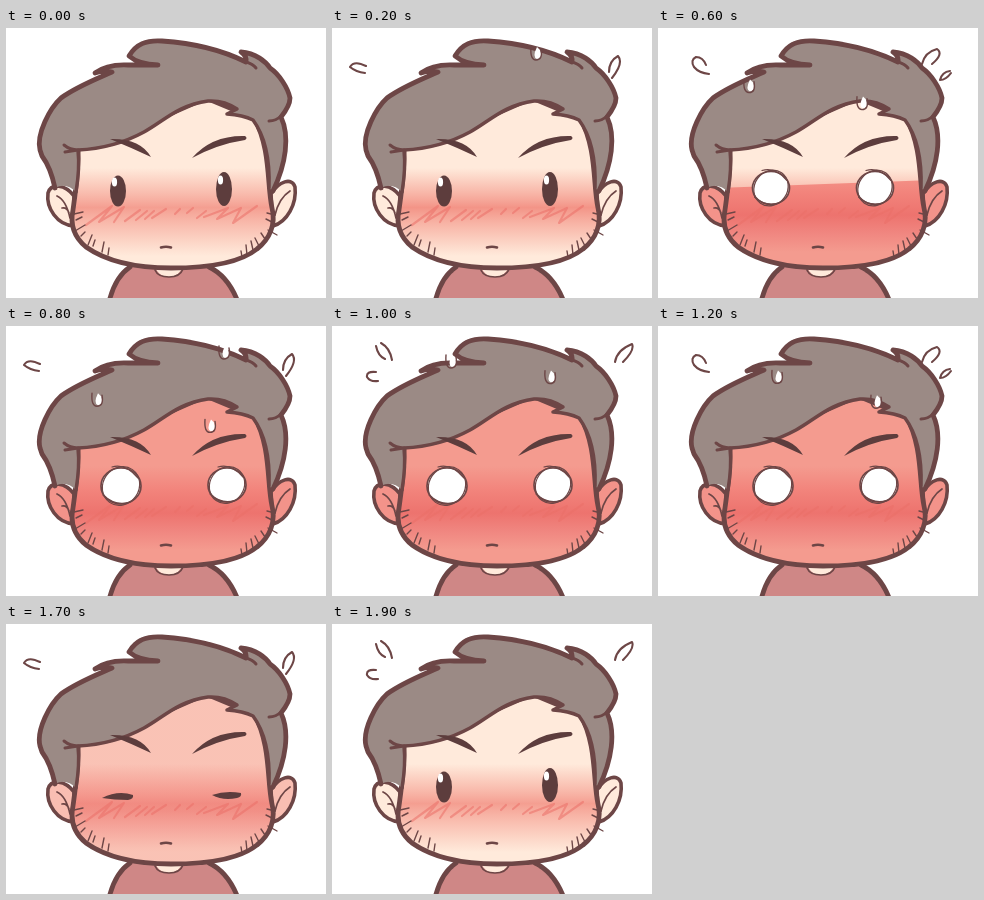
Recreate the animation shown at these times as an HTML page. Size 320 by 270 pixels, loop 2000 ms.

```html
<!DOCTYPE html>
<html lang="en">
<head>
<meta charset="utf-8">
<title>Blushing face</title>
<style>
html, body { margin: 0; width: 100%; height: 100%; overflow: hidden; background: #fff; }
svg { display: block; width: 320px; height: 270px; }
.line { fill: none; stroke: #6d4646; stroke-linecap: round; stroke-linejoin: round; }
.thick { stroke-width: 4.8; }
.thin { stroke-width: 1.7; }
.dark { fill: #5d3d3d; }
.skin { fill: #ffeadb; }
</style>
</head>
<body>
<svg viewBox="0 0 320 270">
  <defs>
    <path id="face" d="M72 118C73 140 70 160 67 182C64 196 68 209 80 219C100 233 130 240 165 240C205 240 235 234 251 221C264 211 270 196 266 180C261 158 265 120 248 90L200 70L150 92Z"/>
    <path id="ears" d="M68 168C59 156 45 155 42 165C40 180 51 197 68 198ZM265 166C273 153 286 149 289 159C291 176 281 194 267 198Z"/>
    <clipPath id="inFace"><use href="#face"/></clipPath>
    <linearGradient id="blush" gradientUnits="userSpaceOnUse" x1="0" y1="140" x2="0" y2="228">
      <stop stop-color="#f5a193" stop-opacity="0"/>
      <stop offset=".22" stop-color="#f5a193" stop-opacity=".55"/>
      <stop offset=".45" stop-color="#f39487"/>
      <stop offset=".65" stop-color="#f5a193" stop-opacity=".7"/>
      <stop offset="1" stop-color="#f5a193" stop-opacity="0"/>
    </linearGradient>
    <linearGradient id="heat" gradientUnits="userSpaceOnUse" x1="0" y1="140" x2="0" y2="240">
      <stop stop-color="#f49b8f"/>
      <stop offset=".25" stop-color="#f2837b"/>
      <stop offset=".47" stop-color="#ed736e"/>
      <stop offset=".65" stop-color="#f08680"/>
      <stop offset=".84" stop-color="#f49b8f"/>
    </linearGradient>
    <g id="drop">
      <path fill="#fff" d="M0-6Q-5 4 0 6Q6 5 3-3Z"/>
      <path class="line" stroke-width="1.4" d="M-6-6Q-7 7-1 7Q6 7 4-4"/>
    </g>
    <path id="hairEdge" d="M49 160C46 146 42 136 36 128L34 122C30 106 44 80 55 70C70 59 88 52 106 44Q97 42 89 45Q101 36 122 37L152 37Q132 36 123 28C130 16 140 12 156 13C186 15 216 22 240 34Q241 28 235 24C250 25 260 34 264 40C273 46 282 60 284 70C284 77 279 84 275 89C284 108 280 136 267 163"/>
    <path id="fringe" d="M263 160C264 132 259 108 247 92Q237 87 221 86L231 81Q218 72 202 73C172 77 158 93 138 104C116 116 93 121 72 122Q74 140 70 164"/>
  </defs>

  <path fill="#cf8786" d="M102 275Q108 247 126 238H200Q222 246 232 275Z"/>
  <path class="skin" d="M149 238H177Q174 248 163 249Q152 249 149 238Z"/>
  <path class="line thin" d="M149 242Q152 249 163 249Q174 249 177 241"/>
  <path class="line thick" d="M103 274Q109 249 124 239M203 239Q222 248 232 274"/>

  <use href="#ears" class="skin"/>
  <use href="#ears" id="hotEars" fill="#f3938a"/>
  <use href="#ears" class="line" stroke-width="3.6"/>
  <path class="line thin" d="M51 168Q60 172 64 190M56 180Q61 179 63 185M284 163Q273 170 269 187"/>

  <use href="#face" class="skin"/>
  <g clip-path="url(#inFace)">
    <rect id="glow" x="60" y="140" width="215" height="90" fill="url(#blush)"/>
    <path id="flush" fill="url(#heat)"/>
    <path id="scribble" fill="none" stroke="#ec7068" stroke-width="2.2" stroke-linecap="round" stroke-linejoin="round"
      d="M80 197L106 178L93 194L118 179L108 194M119 193L134 182M130 192L141 183M139 191L148 183M146 190L160 181M169 186L174 181M181 185L187 180M191 190L200 183M198 189L222 180L211 191L235 180L227 195L251 178"/>
  </g>
  <use href="#face" class="line thick"/>

  <path fill="#9b8a85" d="M49 160C46 146 42 136 36 128L34 122C30 106 44 80 55 70C70 59 88 52 106 44Q97 42 89 45Q101 36 122 37L152 37Q132 36 123 28C130 16 140 12 156 13C186 15 216 22 240 34Q241 28 235 24C250 25 260 34 264 40C273 46 282 60 284 70C284 77 279 84 275 89C284 108 280 136 267 163L263 160C264 132 259 108 247 92Q237 87 221 86L231 81Q218 72 202 73C172 77 158 93 138 104C116 116 93 121 72 122Q74 140 70 164Q60 154 49 160Z"/>
  <use href="#hairEdge" class="line thick"/>
  <use href="#fringe" class="line" stroke-width="3.5"/>
  <path class="line" stroke-width="3" d="M58 117Q64 122 72 122M59 124L72 122M275 88Q270 93 263 93M240 34Q247 36 250 40"/>
  <path class="line" stroke-width="1.4" d="M68 186L77 184M70 192L76 189M69 203L79 197M75 208L79 204M82 217L86 207M87 218L89 212M96 224L98 214M102 227L103 220M269 187L261 185M266 194L260 191M271 207L262 202M259 211L255 205M254 220L249 210M247 222L245 213M241 227L240 217M236 229L235 223"/>
  <path class="dark" d="M104 111Q134 110 145 129Q126 120 104 111ZM186 130Q206 107 239 108Q242 110 239 112Q212 116 186 130Z"/>
  <path class="line" stroke-width="2.6" d="M155 219.5Q160 218 165 219.5"/>

  <g id="open">
    <g class="dark"><ellipse cx="112" cy="163" rx="8" ry="15.5"/><ellipse cx="218" cy="161" rx="8" ry="17"/></g>
    <g fill="#fff"><ellipse cx="108.5" cy="154" rx="2.6" ry="4.5"/><ellipse cx="214.5" cy="152" rx="2.6" ry="4.5"/></g>
  </g>
  <path id="shut" class="dark" d="M96 174Q112 166 127 171Q128 175 122 176Q108 176 96 174ZM206 171Q220 166 235 169Q236 173 231 174Q217 177 206 171Z"/>
  <g id="blank"></g>
  <g id="drops"></g>
  <path id="flicks" class="line" stroke-width="2.1"/>
</svg>
<script>
const $ = id => document.getElementById(id);
const show = (id, on) => $(id).setAttribute('visibility', on ? 'visible' : 'hidden');

const flicks = [
  'M48 37Q45 29 38 29Q32 32 36 39Q41 45 51 46M264 36Q267 24 279 21Q286 26 274 36M292 43Q284 44 282 52Q288 52 293 45',
  'M44 20Q46 30 53 33M49 17Q58 22 60 34M44 46Q34 45 35 51Q38 56 46 55M283 36Q285 24 300 18Q303 24 291 36',
  'M34 38Q22 32 18 39Q24 44 33 45M277 44Q277 33 286 28Q292 35 280 50'
];

// x, y on the first step, fall per step, first and last step
const drops = [
  [205, 25, 12.4, 2, 9],
  [92, 42, 7.8, 4, 9],
  [219, 26, 12.3, 8, 15],
  [120, 35, 7.7, 10, 15]
];

const blankEye = (x, y, r) => `<g transform="translate(${x} ${y})">
  <ellipse rx="${r}" ry="${r - 2}" fill="#fff" stroke="#6d4646" stroke-width="1.7"/>
  <ellipse rx="${r - 2}" ry="${r}" transform="rotate(35)" class="line" stroke-width="1.2"/>
  <path class="line" stroke-width="1.2" d="M${2 - r} 9Q-5 ${r + 1} 9 ${r - 4}M-9 ${1 - r}Q4 ${-r - 3} ${r - 3} -8"/></g>`;

function draw(step) {
  const blank = step >= 6 && step <= 16;
  const shut = !blank && step >= 3 && step <= 18;
  show('open', !blank && !shut);
  show('shut', shut);
  $('blank').innerHTML = !blank ? '' : step < 8
    ? blankEye(113, 160, 18.5) + blankEye(217, 160, 18.5)
    : blankEye(115, 160, 20) + blankEye(221, 159, 19);

  // Heat climbs the face, then fades away.
  const top = step < 8 ? 395 - step * 40 : 60;
  const heat = step < 5 ? 0 : Math.max(0, Math.min(1, (19 - step) / 4));
  $('flush').setAttribute('d', `M60 ${top + 5}L275 ${top - 3}V245H60Z`);
  $('flush').setAttribute('opacity', heat);
  $('hotEars').setAttribute('opacity', step < 6 ? 0 : heat);
  $('glow').setAttribute('opacity', step > 1 && step < 8 ? 1 : .88);
  $('scribble').setAttribute('opacity', .55);

  $('drops').innerHTML = drops
    .filter(([, , , first, last]) => step >= first && step <= last)
    .map(([x, y, fall, first]) => `<use href="#drop" x="${x}" y="${y + fall * (step - first)}"/>`)
    .join('');
  $('flicks').setAttribute('d', step < 2 ? '' : flicks[step % 3]);
}

let last = -1;
function tick() {
  const step = Math.floor(performance.now() % 2000 / 100);
  if (step !== last) draw(last = step);
  requestAnimationFrame(tick);
}
tick();
</script>
</body>
</html>
```
